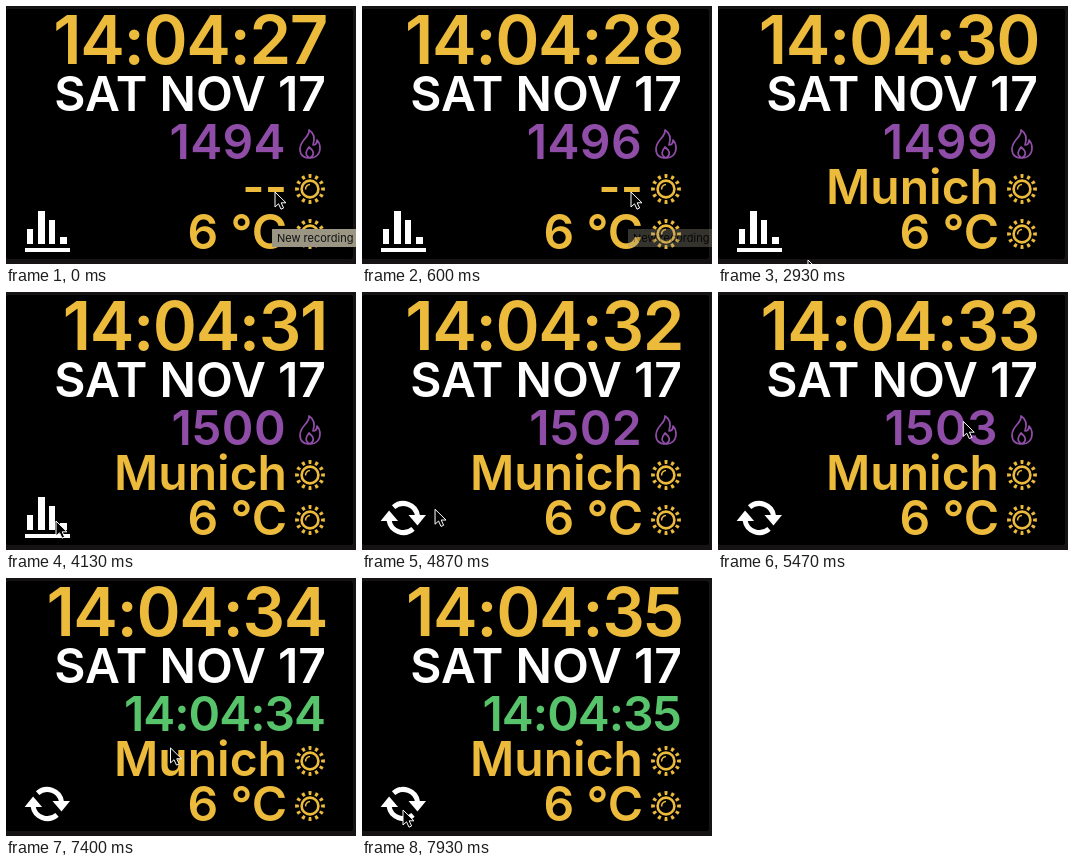
An HTML page that plays this animation: 350x258 px, repeating every 8000 ms.

```html
<!DOCTYPE html>
<html lang="en">
<head>
<meta charset="utf-8">
<title>Watch face</title>
<style>
  html, body { margin: 0; width: 100%; height: 100%; overflow: hidden; background: #000; }
  svg { display: block; width: 350px; height: 258px; }
  text { font: 640 48px Inter, sans-serif; text-anchor: end; }
  #clock { font-size: 67px; letter-spacing: -1.4px; }
  #stat.calories { fill: #8f4da8; letter-spacing: .4px; }
  #stat.timer { fill: #57c46b; letter-spacing: -1px; }
  #tip text { font: 11px Inter, sans-serif; text-anchor: start; }
  .gold { fill: #ecbb3c; }
  .line { fill: none; stroke-width: 1.7; stroke-linecap: round; stroke-linejoin: round; }
</style>
</head>
<body>
<svg viewBox="0 0 350 258">
  <defs>
    <g id="sun" fill="none" stroke="#ecbb3c">
      <circle r="8.4" stroke-width="2.6"/>
      <path d="M-4.4 .5A4.5 4.5 0 0 1 0-4.4" stroke-width="1.5"/>
      <circle r="13" stroke-width="3.8" pathLength="120" stroke-dasharray="4.4 5.6" stroke-dashoffset="2.2"/>
    </g>
  </defs>
  <rect width="350" height="258" fill="#151314"/>
  <rect y="3" width="347" height="250" rx="3"/>

  <text id="clock" class="gold" x="321" y="58"></text>
  <text x="320" y="105" fill="#fff">SAT NOV 17</text>
  <text id="stat" y="153"></text>
  <path id="flame" class="line" stroke="#8f4da8"
    d="M303 124C304 131 294 134 294 143C294 149 298 152 304 152C310 152 314 148 314 142C314 139 313 136 311 134C311 137 310 139 307 139C309 133 308 127 303 124ZM304 152C298 149 300 145 303 141C308 145 309 149 304 152"/>
  <text id="place" class="gold" x="281" y="198"></text>
  <text class="gold" x="281" y="243">6 °C</text>
  <use href="#sun" x="304" y="183"/>
  <use href="#sun" x="304" y="228"/>

  <path id="bars" fill="#fff" d="M21 223h6v15h-6zM32 205h7v33h-7zM43 214h6v24h-6zM54 231h7v7h-7zM19 242h45v4h-45z"/>
  <g id="cycle" fill="#fff">
    <g id="arrow">
      <path d="M31.6 215.2A14.5 14.5 0 0 1 55.6 224" fill="none" stroke="#fff" stroke-width="5"/>
      <path d="M46.5 223H64L55.5 233.5Z"/>
    </g>
    <use href="#arrow" transform="rotate(180 41.3 226)"/>
  </g>

  <g id="tip">
    <rect x="266" y="223" width="84" height="18" fill="#9b9584"/>
    <text x="271" y="236" fill="#111">New recording</text>
  </g>
  <path id="pointer" d="M0 0V15L3.5 11.8L6 17.2L8.6 16L6.2 10.8H11Z" stroke="#fff"/>
</svg>
<script>
const LOOP = 8000;
const $ = id => document.getElementById(id);
const home = [269, 186];
const moves = [
  { start: 2000, end: 2200, to: [90, 254] },
  { start: 2930, end: 4130, to: [50, 229] },
  { start: 4700, end: 5500, to: [246, 129] },
  { start: 7000, end: 7930, to: [41, 232] }
];

const clamp = v => Math.min(1, Math.max(0, v));
const ease = p => p * p * (3 - 2 * p);
const show = (id, on) => $(id).style.display = on ? '' : 'none';

const pointerAt = t => moves.reduce((pos, { start, end, to }) => {
  const p = ease(clamp((t - start) / (end - start)));
  return pos.map((v, k) => v + (to[k] - v) * p);
}, home);

function draw(now) {
  const t = now % LOOP;
  const tick = Math.floor((t + 530) / 1000);
  const time = '14:04:' + (27 + tick);
  const tapped = t >= 5600;

  $('clock').textContent = time;
  $('stat').textContent = !tapped ? 1494 + Math.round(tick * 1.5) : t < 6470 ? '--' : time;
  $('stat').setAttribute('class', tapped ? 'timer' : 'calories');
  $('stat').setAttribute('x', tapped ? 319 : 280);
  $('place').textContent = t < 1670 ? '--' : 'Munich';
  show('flame', !tapped);
  show('bars', t < 4470);
  show('cycle', t >= 4470);
  $('tip').style.opacity = 1 - clamp((t - 470) / 200);
  $('pointer').setAttribute('transform', `translate(${pointerAt(t)})`);
  requestAnimationFrame(draw);
}
requestAnimationFrame(draw);
</script>
</body>
</html>
```
